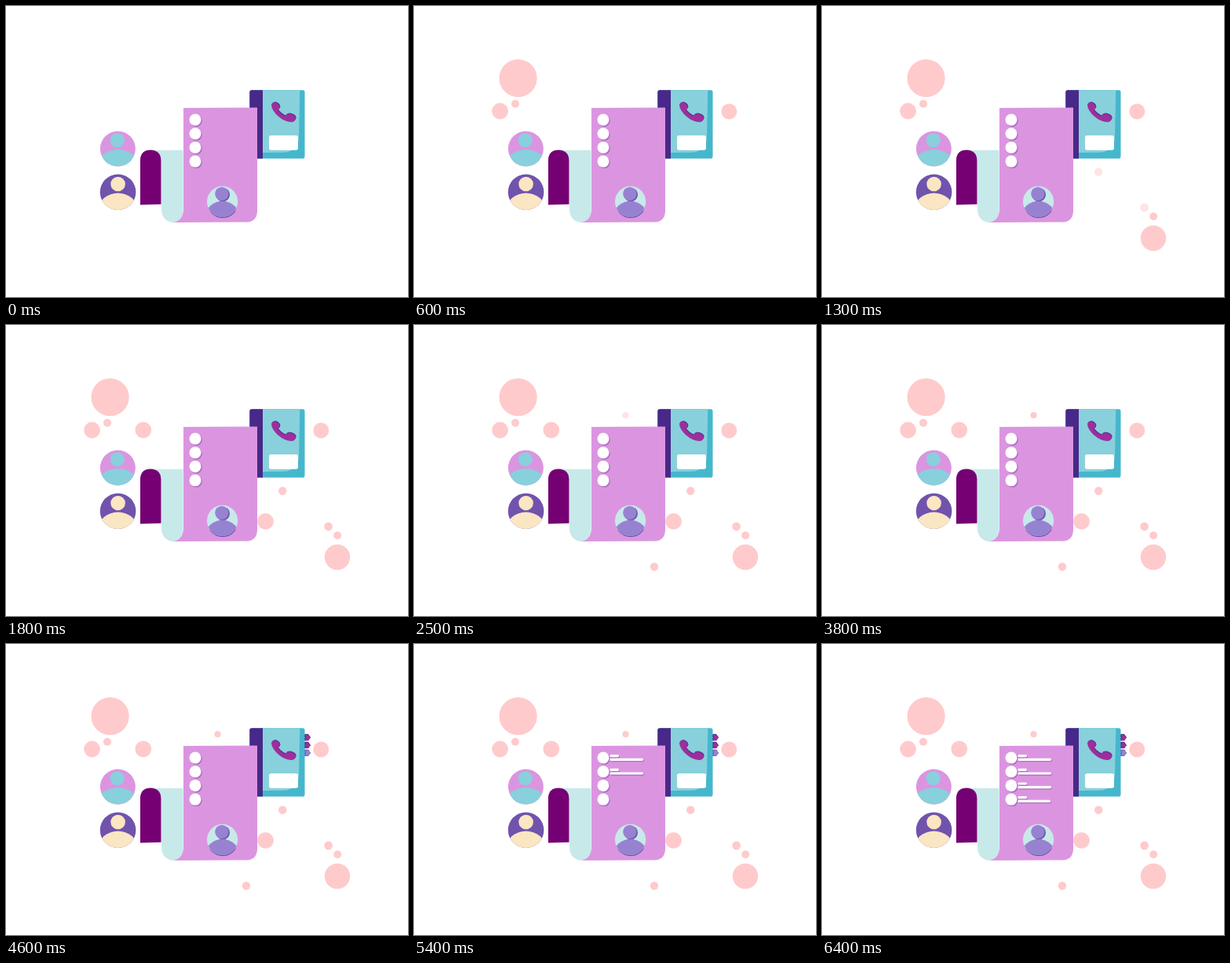
Animation of 512 by 371 pixels, one loop 6.6 s. Source, as an HTML page:

```html
<!DOCTYPE html>
<html lang="en">
<head>
<meta charset="utf-8">
<title>Contacts</title>
<style>
  html, body { margin: 0; width: 100%; height: 100%; overflow: hidden; background: #fff; }
  svg { display: block; width: 100%; height: 100%; }
</style>
</head>
<body>
<svg viewBox="0 0 512 371">
  <defs>
    <clipPath id="friendA"><circle cx="142.4" cy="182" r="22.5"/></clipPath>
    <clipPath id="friendB"><circle cx="142.6" cy="237.2" r="22.8"/></clipPath>
    <clipPath id="owner"><circle cx="275.6" cy="249.3" r="19.6"/></clipPath>
    <clipPath id="cover"><rect x="310.3" y="107.3" width="70.2" height="87.2" rx="2.8"/></clipPath>
    <path id="handset" d="M338 126.5Q338.5 122.5 343.5 123Q348.5 125 348.8 129Q348.3 132 346 132.2Q350 138 356 140.3Q357 137.3 361 137.3Q367.5 138.3 369 142.3Q368.6 147.6 364 148Q355 148 346 140Q338.6 133 338 126.5Z"/>
  </defs>

  <g id="bubbles" fill="#ffcacb"></g>

  <!-- phone book -->
  <g id="tabs"></g>
  <g clip-path="url(#cover)">
    <rect x="310" y="107" width="71" height="88" fill="#45b7cd"/>
    <path d="M327 107H374.3L373 168Q371.5 186.5 352 186.8L327 187Z" fill="#88d0dc"/>
    <rect x="310" y="107" width="17" height="88" fill="#482888"/>
  </g>
  <rect x="335" y="165" width="37" height="18.7" rx="2.6" fill="#fff"/>
  <use href="#handset" x=".6" y="-.8" fill="#482888"/>
  <use href="#handset" fill="#9c2f9c"/>

  <!-- rolled sheet -->
  <path d="M184 183.7H225.5V262Q224 276 212 276Q199 274 198 260V197Q197 185 184 183.7Z" fill="#c8e9ea"/>
  <path d="M171 253.6V195.5Q172 183.6 184 183.6Q196.500 184 197.500 196V252.700Z" fill="#750073"/>
  <path d="M226 130L320 129.500V262Q319 275 307 275.500L213 276Q225 274 226 260Z" fill="#db95e0"/>
  <g id="rows"></g>

  <!-- people -->
  <g clip-path="url(#friendA)">
    <rect x="118" y="158" width="50" height="50" fill="#db95e0"/>
    <g fill="#88d0dc"><circle cx="141.700" cy="171.200" r="9"/><ellipse cx="142.400" cy="205" rx="27" ry="22"/></g>
  </g>
  <g clip-path="url(#friendB)">
    <rect x="118" y="213" width="50" height="50" fill="#7053ad"/>
    <g fill="#fae6c2"><circle cx="142.600" cy="227" r="9.300"/><ellipse cx="142.600" cy="260" rx="25" ry="21.500"/></g>
  </g>
  <circle cx="276" cy="251" r="19.500" fill="#7053ad" clip-path="inset(22px 3px 0 3px)"/>
  <g clip-path="url(#owner)">
    <rect x="255" y="229" width="42" height="42" fill="#c8e9ea"/>
    <circle cx="276.200" cy="240.500" r="8.800" fill="#7053ad"/>
    <g fill="#9782d1"><circle cx="274.800" cy="239.300" r="8.600"/><ellipse cx="275.600" cy="267" rx="21" ry="18.200"/></g>
  </g>
</svg>
<script>
const LOOP = 6600, FADE = 100;
const parts = [];

function add(parent, tag, attrs) {
  const el = document.createElementNS('http://www.w3.org/2000/svg', tag);
  for (const key in attrs) el.setAttribute(key, attrs[key]);
  return parent.appendChild(el);
}

function reveal(el, at) { parts.push({ el, at }); }

const bubbles = document.getElementById('bubbles');
const tabs = document.getElementById('tabs');
const rows = document.getElementById('rows');

// x, y, radius, start time
[
  [132.6, 92, 24.1, 100], [401.3, 134.4, 10, 100],
  [109.6, 134, 10.4, 500], [129, 124.8, 5, 500],
  [422, 296, 16.2, 900], [422.2, 268.2, 5, 900],
  [410.6, 257, 5.4, 1300], [352.2, 211.5, 5.2, 1300],
  [330.5, 250.3, 10.4, 1700], [174.8, 133.8, 10.4, 1700],
  [306, 308.2, 5.2, 2100], [269.5, 115, 4.1, 2500]
].forEach(([cx, cy, r, at]) => reveal(add(bubbles, 'circle', { cx, cy, r }), at));

[['#9c2f9c', '#482888', 4100], ['#9c2f9c', '#482888', 4500], ['#9782d1', '#7053ad', 4500]]
  .forEach(([fill, edge, at], i) => {
    const y = 114.8 + i * 9.9;
    const tab = add(tabs, 'g', {});
    add(tab, 'path', { d: `M380 ${y}h5l3 4.2l-3 4.200h-5z`, fill: edge });
    add(tab, 'path', { d: `M381.500 ${y + 1}h3.700l2.500 3.400l-2.500 3.600h-3.700z`, fill });
    reveal(tab, at);
  });

[4900, 5300, 5700, 6000].forEach((at, i) => {
  const y = 145 + i * 17.7;
  add(rows, 'circle', { cx: 242.3, cy: y + 1.5, r: 7.5, fill: '#ae6fc4' });
  add(rows, 'circle', { cx: 241, cy: y, r: 7.5, fill: '#fff' });
  const lines = add(rows, 'g', { fill: 'none', 'stroke-width': 3.2, 'stroke-linecap': 'round' });
  const d = `M251 ${y - 2.4}h8.500M251 ${y + 2.3}h${i < 3 ? 39.5 : 38.5}`;
  add(lines, 'path', { d, stroke: '#ae6fc4', transform: 'translate(.9 1.3)' });
  add(lines, 'path', { d, stroke: '#fff' });
  reveal(lines, at);
});

function draw(now) {
  const t = now % LOOP;
  for (const { el, at } of parts) {
    el.setAttribute('opacity', t < at ? 0 : t < at + FADE ? 0.5 : 1);
  }
  requestAnimationFrame(draw);
}

const start = performance.now();
draw(0);
function tick(now) { draw(Math.max(0, now - start)); }
draw = (frame => now => frame(Math.max(0, now - start)))(draw);
</script>
</body>
</html>
```
